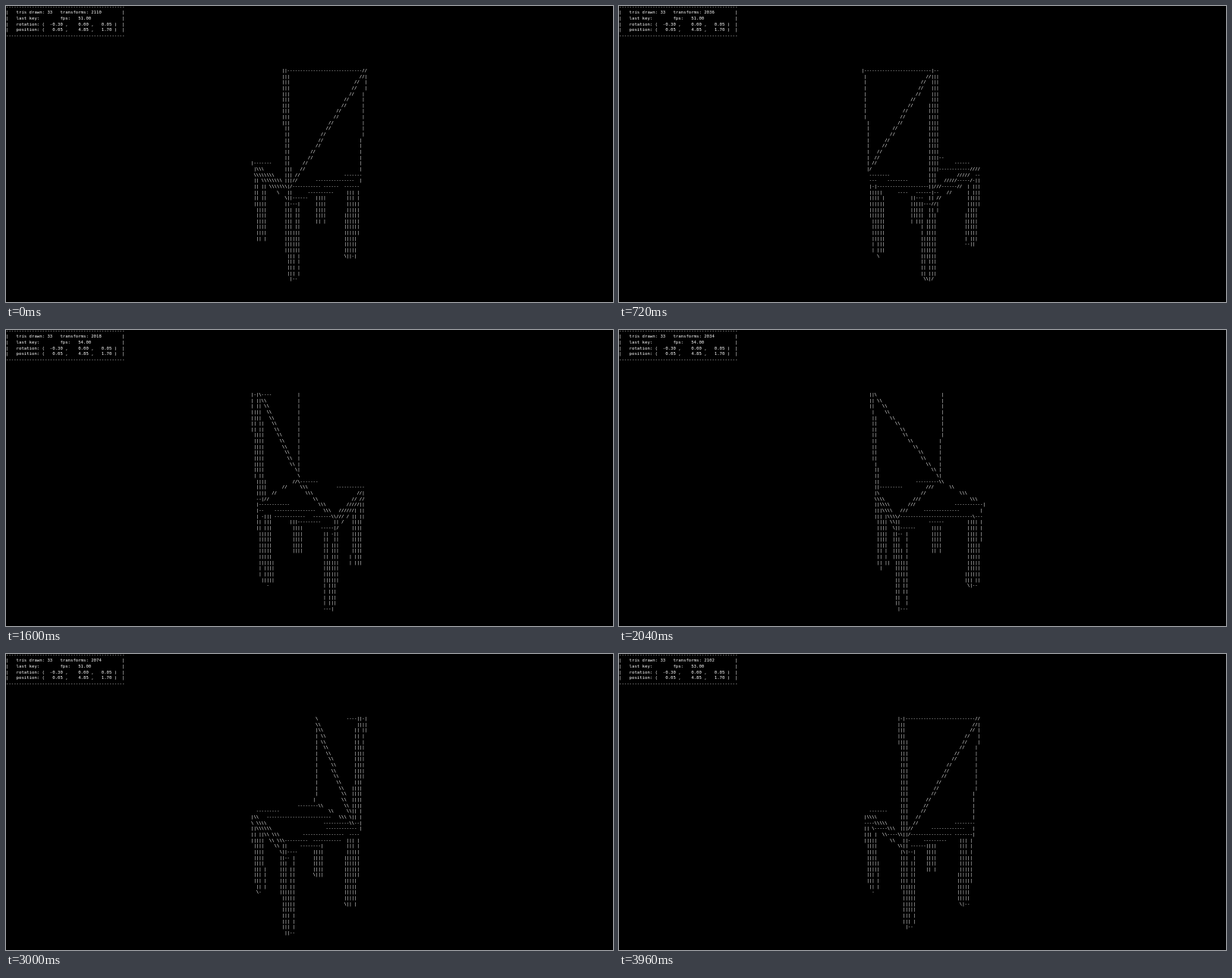
An HTML page with a canvas for the animation above (4000 ms loop, 800 px wide and 391 px high).

```html
<!DOCTYPE html>
<html lang="en">
<head>
<meta charset="utf-8">
<title>ASCII chair</title>
<style>
  html, body { margin: 0; width: 100%; height: 100%; overflow: hidden; background: #000; }
  canvas { display: block; }
</style>
</head>
<body>
<canvas id="screen" width="800" height="391"></canvas>
<script>
const ctx = document.getElementById('screen').getContext('2d');
const CELL_W = 3.4, CELL_H = 7.65, ROW_0 = 1.3, COLS = 236, ROWS = 51;
const LOOP = 4000, STEP = 40;
const START_ANGLE = -28 * Math.PI / 180;
const PITCH = 0.3, FOCAL = 406, CENTER_X = 398.5, CENTER_Y = 195;

// Lengths are relative to the camera distance; heights are measured down from the eye.
const BACK_W = 0.131, FRONT_W = 0.149, BACK = 0.126, FRONT = -0.158;
const THICK = 0.03, LEG = 0.034;
const TOP = 0.026, SEAT = 0.367, SEAT_LOW = 0.408, FLOOR = 0.688;

// Corners run far left, far right, near right, near left (chair seen from behind).
function prism(corners, high, low) {
  const points = [high, low].flatMap(h => corners.map(([x, n]) => [x, n, h]));
  const faces = [[0, 1, 2, 3], [7, 6, 5, 4]];
  for (let i = 0; i < 4; i++) {
    const j = (i + 1) % 4;
    const side = [j, i, i + 4, j + 4];
    if (i < 2) side.push(side.shift()); // turns the diagonal the other way
    faces.push(side);
  }
  return { points, faces };
}
const rect = (x0, x1, far, near) => [[x0, far], [x1, far], [x1, near], [x0, near]];
const leg = (x, n) => prism(rect(x, x + LEG, n, n + LEG), SEAT_LOW, FLOOR);

const chair = [
  prism(rect(-BACK_W, BACK_W, BACK - THICK, BACK), TOP, SEAT),
  prism([[-FRONT_W, FRONT], [FRONT_W, FRONT], [BACK_W, BACK], [-BACK_W, BACK]], SEAT, SEAT_LOW),
  leg(-BACK_W, BACK - LEG), leg(BACK_W - LEG, BACK - LEG),
  leg(-FRONT_W, FRONT), leg(FRONT_W - LEG, FRONT)
];

function project([x, n, h], angle) {
  const c = Math.cos(angle), s = Math.sin(angle);
  const dist = 1 - (n * c + x * s);
  const depth = dist * Math.cos(PITCH) + h * Math.sin(PITCH);
  const down = h * Math.cos(PITCH) - dist * Math.sin(PITCH);
  return {
    x: (CENTER_X + FOCAL * (x * c - n * s) / depth) / CELL_W - 0.5,
    y: (CENTER_Y + FOCAL * down / depth - ROW_0) / CELL_H,
    near: 1 / depth
  };
}

const cross = (p, q, x, y) => (q.x - p.x) * (y - p.y) - (q.y - p.y) * (x - p.x);

function edgeChar(p, q) {
  const dx = (q.x - p.x) * CELL_W, dy = (q.y - p.y) * CELL_H;
  const slope = Math.abs(dy / dx);
  if (slope < 0.45) return '-';
  if (slope > 4.5) return '|';
  return dx * dy > 0 ? '\\' : '/';
}

function drawTriangle(tri, grid, depths) {
  const [a, b, c] = tri;
  const area = cross(a, b, c.x, c.y);
  if (area <= 0) return;
  const edges = [[b, c], [c, a], [a, b]].map(([p, q]) => ({
    p, q, char: edgeChar(p, q),
    reach: Math.max(Math.abs(q.y - p.y), 0.58 * Math.abs(q.x - p.x))
  }));
  const xs = tri.map(v => v.x), ys = tri.map(v => v.y);
  for (let y = Math.ceil(Math.min(...ys)); y <= Math.max(...ys); y++) {
    for (let x = Math.ceil(Math.min(...xs)); x <= Math.max(...xs); x++) {
      const weights = edges.map(e => cross(e.p, e.q, x, y));
      if (Math.min(...weights) < 0) continue;
      let char = ' ', best = 1, near = 0;
      weights.forEach((w, i) => {
        near += w * tri[i].near / area;
        const d = w / edges[i].reach;
        if (d <= best) { best = d; char = edges[i].char; }
      });
      if (char !== ' ') near *= 1.004; // keeps outlines above coplanar faces
      const cell = y * COLS + x;
      if (near > depths[cell]) { depths[cell] = near; grid[cell] = char; }
    }
  }
}

function drawChair(angle, grid) {
  const depths = new Float32Array(COLS * ROWS);
  for (const { points, faces } of chair) {
    const v = points.map(p => project(p, angle));
    for (const [i, j, k, l] of faces) {
      drawTriangle([v[i], v[j], v[l]], grid, depths);
      drawTriangle([v[j], v[k], v[l]], grid, depths);
    }
  }
}

const transformKeys = [[0, 2110], [1000, 2008], [1600, 2018], [2520, 2050],
                       [3000, 2074], [3960, 2102], [4000, 2110]];
function transformCount(t) {
  const i = transformKeys.findIndex(key => key[0] > t);
  const [t0, v0] = transformKeys[i - 1], [t1, v1] = transformKeys[i];
  return 2 * Math.round((v0 + (v1 - v0) * (t - t0) / (t1 - t0)) / 2);
}

function hud(t) {
  const rearView = t >= 320 && t < 520;
  const tris = rearView ? 36 : 33;
  const transforms = transformCount(t) + (rearView ? 306 : 0);
  const fps = t < 1120 ? 51 : t < 2800 ? 54 : t < 3600 ? 51 : 53;
  const line = text => ('|   ' + text).padEnd(45) + '|';
  const rule = '-'.repeat(46);
  return [
    rule,
    line(`tris drawn: ${tris}   transforms: ${transforms}`),
    line(`last key:        fps:   ${fps}.00`),
    line('rotation: (  -0.30 ,    0.00 ,   0.05 )'),
    line('position: (   0.05 ,    4.85 ,   1.70 )'),
    rule
  ];
}

function render(t) {
  const grid = new Array(COLS * ROWS).fill(' ');
  drawChair(START_ANGLE + 2 * Math.PI * t / LOOP, grid);
  hud(t).forEach((text, row) => [...text].forEach((ch, col) => { grid[row * COLS + col] = ch; }));

  ctx.setTransform(1, 0, 0, 1, 0, 0);
  ctx.fillStyle = '#000';
  ctx.fillRect(0, 0, 800, 391);
  // Text is set in 8 by 18 cells and scaled down so that positions stay fractional.
  const scale = CELL_W / 8;
  ctx.scale(scale, scale);
  ctx.font = '13.33px "DejaVu Sans Mono", monospace';
  ctx.textAlign = 'center';
  ctx.textBaseline = 'middle';
  ctx.fillStyle = '#fff';
  grid.forEach((ch, i) => {
    if (ch === ' ') return;
    const col = i % COLS, row = Math.floor(i / COLS);
    ctx.fillText(ch, (col + 0.5) * 8, ROW_0 / scale + row * 18);
  });
}

const start = performance.now();
function frame() {
  const t = (performance.now() - start) % LOOP;
  render(Math.floor(t / STEP) * STEP);
  requestAnimationFrame(frame);
}
frame();
</script>
</body>
</html>
```
